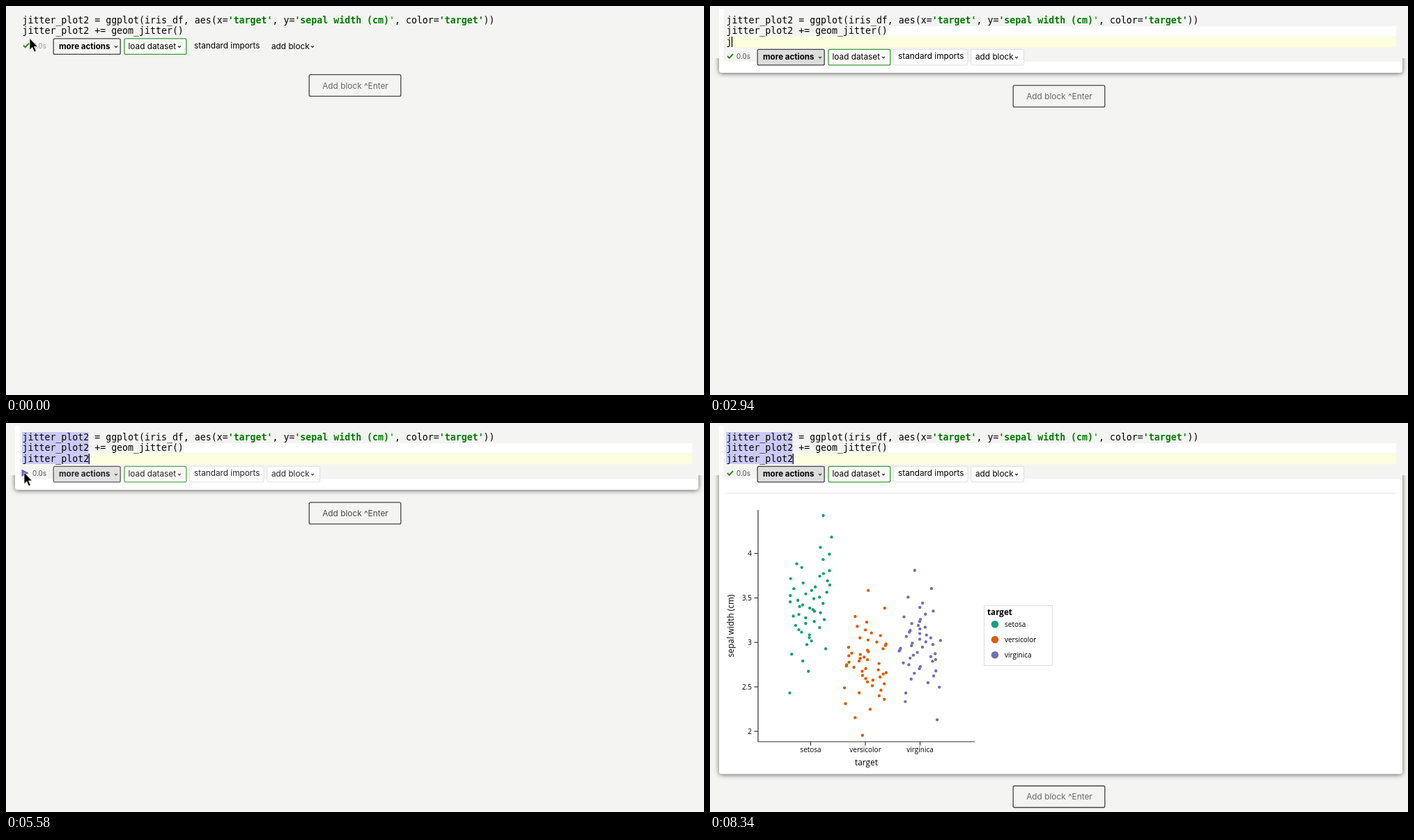
These frames come from a looping animation (1002x559 px, 8.4 s). An HTML page with a canvas:

```html
<!DOCTYPE html>
<html lang="en">
<head>
<meta charset="utf-8">
<title>Notebook block</title>
<style>
  html, body { margin: 0; width: 100%; height: 100%; overflow: hidden; background: #f4f4f2; }
  canvas { display: block; }
</style>
</head>
<body>
<canvas id="stage" width="1002" height="559"></canvas>
<script>
const ctx = document.getElementById('stage').getContext('2d');
const LOOP = 8400, STEP = 60, LINE = 15.5, BG = '#f4f4f2';
const CODE = '13.25px "DejaVu Sans Mono", monospace';
const UI = 'Inter, sans-serif', CHART = '"Open Sans", sans-serif';
const CODE_X = 23.5, BASELINE = 24.6, NAME = 'jitter_plot2';

const FIRST_LINE = [
  [NAME + ' = ggplot(iris_df, aes(x='], ["'target'", 1], [', y='],
  ["'sepal width (cm)", 1], ["'", 0, '#008000'], [', color='], ["'target'", 1], ['))']
];

// Mouse positions: time, x, y
const MOUSE = [
  [0, 34, 46.5], [900, 25, 63], [1800, 115, 49], [2040, 245, 32],
  [5040, 244, 49], [5580, 26, 71], [6780, 26, 71], [7500, 38, 560]
];

// Mean and standard deviation of the sepal width of each species
const GROUPS = [
  { name: 'setosa', color: '#1b9e77', mean: 3.43, deviation: .38 },
  { name: 'versicolor', color: '#d95f02', mean: 2.77, deviation: .31 },
  { name: 'virginica', color: '#7570b3', mean: 2.97, deviation: .32 }
];

let seed = 11;
const random = () => (seed = (seed * 16807) % 2147483647) / 2147483647;
const groupX = i => 144.5 + 78.5 * i;
const valueY = v => 187.5 + (4 - v) * 127.8;

// Fifty evenly spaced quantiles per species, jittered sideways
GROUPS.forEach((g, i) => {
  g.points = Array.from({ length: 50 }, (_, k) => {
    const p = (k + .5) / 50, z = Math.log(p / (1 - p)) / 1.75;
    return [groupX(i) + (random() - .5) * 60, valueY(g.mean + z * g.deviation)];
  });
});

const ramp = (t, a, b) => Math.min(1, Math.max(0, (t - a) / (b - a)));
const ease = p => p * p * (3 - 2 * p);

function text(str, x, y, font, color = '#000', align = 'left') {
  ctx.font = font;
  ctx.fillStyle = color;
  ctx.textAlign = align;
  ctx.fillText(str, x, y);
  return ctx.measureText(str).width;
}

function rect(x, y, w, h, color) {
  ctx.fillStyle = color;
  ctx.fillRect(x, y, w, h);
}

function box(x, y, w, h, fill, border, width = 1.3, radius = 2) {
  ctx.beginPath();
  ctx.roundRect(x, y, w, h, radius);
  if (fill) { ctx.fillStyle = fill; ctx.fill(); }
  if (border) { ctx.strokeStyle = border; ctx.lineWidth = width; ctx.stroke(); }
}

function path(points, { stroke, fill, width = 1, close = false }) {
  ctx.beginPath();
  points.forEach(([x, y]) => ctx.lineTo(x, y));
  if (close) ctx.closePath();
  if (fill) { ctx.fillStyle = fill; ctx.fill(); }
  if (stroke) { ctx.strokeStyle = stroke; ctx.lineWidth = width; ctx.stroke(); }
}

function dot(x, y, r, color) {
  ctx.beginPath();
  ctx.arc(x, y, r, 0, 2 * Math.PI);
  ctx.fillStyle = color;
  ctx.fill();
}

function drawBlock(t, open, bottom) {
  ctx.globalAlpha = ramp(t, 1200, 1800);
  rect(13, 4, 6.5, 76, '#fff');
  if (!open) {
    rect(23, 65, 31, 15, '#fff');
    const shade = ctx.createLinearGradient(0, 80, 0, 91);
    shade.addColorStop(0, '#bbb');
    shade.addColorStop(1, BG);
    rect(24, 80, 16, 11, shade);
  }
  ctx.globalAlpha = 1;
  if (!open) return;

  ctx.save();
  ctx.beginPath();
  ctx.rect(0, 75, 1002, 484);
  ctx.clip();
  ctx.shadowColor = 'rgba(0,0,0,.6)';
  ctx.shadowBlur = 7;
  ctx.shadowOffsetY = 1;
  box(13, 40, 981, bottom - 40, '#fff', null, 0, 4);
  ctx.restore();
  rect(20, 60, 974, 20, BG);
  rect(255, 29, 730, 14.5, '#fff');
  rect(22, 43.5, 963, 16, '#fdfde0');
}

function drawCode(t, open) {
  if (t >= 4200) rect(23, 13, 95.5, 46, '#cbcaf6');
  if (t >= 2220 && !open) rect(240, 29, 15, 14, '#a9c2ee');
  let x = CODE_X;
  for (const [str, bold, color] of FIRST_LINE)
    x += text(str, x, BASELINE, (bold ? 'bold ' : '') + CODE, color || (bold ? '#007a00' : '#000'));
  const secondWidth = text(NAME + ' += geom_jitter()', CODE_X, BASELINE + LINE, CODE);
  if (t < 2220) return;

  const typed = NAME.slice(0, Math.max(0, Math.floor((t - 2940) / STEP) + 1));
  const typedWidth = text(typed, CODE_X, BASELINE + 2 * LINE, CODE);
  if (open) rect(CODE_X + typedWidth - .6, 44, 1.3, 15, '#000');
  else rect(CODE_X + secondWidth - .6, 29, 1.3, 14.5, '#000');
}

function drawToolbar(t, open) {
  const dim = t < 5880 ? .5 * ramp(t, 3120, 3420) - .35 * ramp(t, 4080, 4560) : 0;
  ctx.save();
  ctx.translate(0, open ? LINE : 0);

  if (t >= 3120 && t < 6120) {
    path([[22.5, 51], [32.5, 56.3], [22.5, 61.5]], { fill: t < 5880 ? '#6d65ab' : '#444', close: true });
  } else {
    path([[25, 56.5], [27.7, 59.3], [33, 53.5]], { stroke: '#2f8c1e', width: 2 });
  }
  text('0.0s', 38, 60.5, '9.8px ' + UI, t < 900 ? '#999' : '#555');

  ctx.globalAlpha = 1 - dim;
  const button = (label, x, w, textX, { baseline = 61.8, fill, border, width = 1.3, arrowX, font = '11.8px ' }) => {
    box(x, 46.8, w, 22.6, fill, border, width);
    text(label, textX, baseline, font + UI);
    if (arrowX) path([[arrowX - 2, 57.4], [arrowX, 59.4], [arrowX + 2, 57.4]], { stroke: '#222', width: 1.1 });
  };
  const plain = open ? { fill: '#fff', border: '#ddd', width: 1 } : {};
  button('more actions', 68.2, 96, 76,
    { fill: t >= 2220 && '#ddd', border: '#444', arrowX: 158, font: 'bold 11.6px ' });
  button('load dataset', 170, 88.8, 175.5, { fill: '#fafaf8', border: '#3c9a34', arrowX: 249 });
  button('standard imports', 263.5, 106.5, 270, { ...plain, baseline: 60.9 });
  button('add block', 374.8, 75.8, 381, { ...plain, arrowX: 440 });
  ctx.restore();
}

function drawAddBlock(t, y) {
  box(435.2, y, 131.6, 31, null, '#444');
  const color = t >= 3300 && t < 5880 ? '#444' : '#666';
  text('Add block ^Enter', 501.5, y + 19.8, '11.85px ' + UI, color, 'center');
}

function drawChart() {
  const axis = { stroke: '#333', width: 1.2 };
  const small = '500 10px ' + CHART, large = '500 11.9px ' + CHART;
  path([[69, 125], [69, 458], [380, 458]], axis);
  for (let v = 2; v <= 4; v += .5) {
    const y = valueY(v);
    path([[63.5, y], [69, y]], axis);
    text(String(v), 60, y + 3.5, small, '#000', 'right');
  }
  text('target', 224.5, 491.5, large, '#000', 'center');
  ctx.save();
  ctx.translate(34, 291.5);
  ctx.rotate(-Math.PI / 2);
  text('sepal width (cm)', 0, 0, large, '#000', 'center');
  ctx.restore();

  box(393.5, 262.5, 98, 86, '#fff', '#ddd', 1, 0);
  text('target', 398, 275.5, 'bold 11.7px ' + CHART);
  GROUPS.forEach((g, i) => {
    const x = groupX(i), legendY = 289.3 + 22 * i;
    path([[x, 458], [x, 463.5]], axis);
    text(g.name, x, 473, small, '#000', 'center');
    g.points.forEach(([px, py]) => dot(px, py, 2.2, g.color));
    dot(409, legendY, 5.3, g.color);
    text(g.name, 423, legendY + 3.7, small);
  });
}

function drawMouse(t) {
  if ((t >= 2220 && t < 4920) || t >= 7500) return;
  const next = MOUSE.findIndex(k => k[0] > t);
  const [t0, x0, y0] = MOUSE[next - 1], [t1, x1, y1] = MOUSE[next];
  const p = ease(ramp(t, t0, t1));
  ctx.save();
  ctx.translate(x0 + (x1 - x0) * p, y0 + (y1 - y0) * p);
  path([[0, 0], [0, 16.5], [3.8, 13], [6.5, 19.5], [9.3, 18.3], [6.5, 12], [11.5, 12]],
    { fill: '#000', stroke: '#eee', width: .8, close: true });
  ctx.restore();
}

function draw(t) {
  const open = t >= 2460, expanded = t >= 5940;
  rect(0, 0, 1002, 559, BG);
  drawBlock(t, open, expanded ? 504.5 : 96);
  drawCode(t, open);
  drawToolbar(t, open);
  drawAddBlock(t, expanded ? 521.5 : open ? 114.2 : 98.7);
  if (expanded) rect(22, 100.5, 962, 1, '#e4e4e4');
  if (t >= 6120) drawChart();
  drawMouse(t);
}

function frame() {
  draw(Math.floor(performance.now() % LOOP / STEP) * STEP);
  requestAnimationFrame(frame);
}
frame();
</script>
</body>
</html>
```
